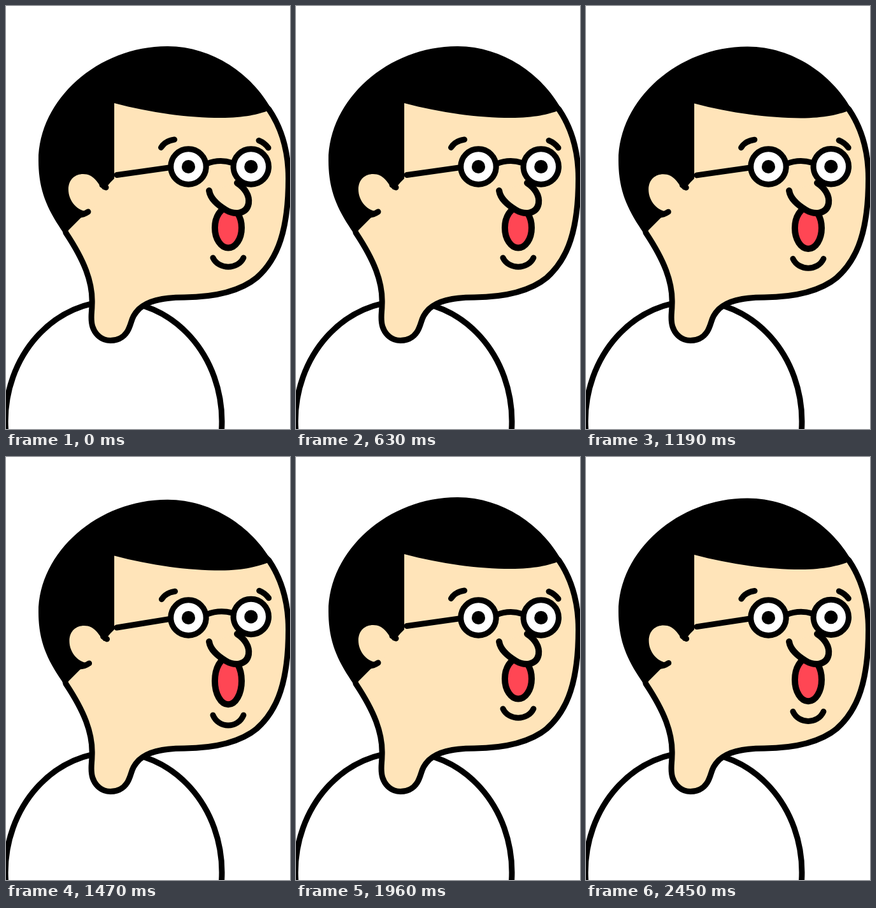
Recreate the animation shown at these times as an HTML page. Size 446 by 662 pixels, loop 2.52 s.

```html
<!DOCTYPE html>
<html lang="en">
<head>
<meta charset="utf-8">
<title>Talking head</title>
<style>
html, body { margin: 0; width: 100%; height: 100%; overflow: hidden; background: #fff; }
svg { display: block; width: 446px; height: 662px; }
.line { fill: none; stroke: #000; stroke-width: 9; stroke-linecap: round; stroke-linejoin: round; }
.bold { stroke-width: 10; }
.skin { fill: #ffe4b9; }
.white { fill: #fff; }
.red { fill: #ff4654; }
</style>
</head>
<body>
<svg viewBox="0 0 446 662">
  <ellipse class="line" cx="169" cy="650" rx="170" ry="188"/>
  <path class="line skin" d="M413 162C434 193 443.5 230 443.5 270C443.5 350 427 396 394 425C366 448 325 455.5 280 456C243 456 222 462 209 474C198 485 198 492 194 502C189 516 178 523.5 164 523.5C150 523.5 140 514 136 502C132 490 135 480 135 468C137 432 122 397 94 355L80 300L110 130L250 90L380 130Z"/>
  <path id="hair"/>
  <g id="ear">
    <path class="skin" d="M131 322C112 322 98 305 98 287C98 271 109 263 121 263C138 263 144 277 152 287L160 289L150 302Z"/>
    <path class="line" d="M113 327Q122 327 129 322M151 280L157 284"/>
  </g>
  <ellipse id="mouth" class="line bold red" cx="349" rx="21"/>
  <path class="line bold skin" d="M319 289C321 302 332 311 345 319C360 328 378 325 381 309C383 296 374 284 363 277"/>
  <path id="smile" class="line"/>
  <path id="browL" class="line" d="M243.5 221.5Q250 211 264.5 209"/>
  <path id="browR" class="line" d="M397 210.5Q406 214 412 222"/>
  <path id="frame" class="line"/>
  <g id="eyeL"><circle class="line white" r="27.7"/><circle r="10.5"/></g>
  <g id="eyeR"><circle class="line white" r="27.7"/><circle r="10.5"/></g>
</svg>
<script>
const STEP = 70, STEPS = 36;
// Jaw drop per step: two beats of talking
const DROP = [0, .22, .62, .95, 1, .78, .45, .18, .04, 0, .12, .42, .75, 1, .92, .6, .27, .1, .03];

const el = id => document.getElementById(id);
const draw = (id, d) => el(id).setAttribute("d", d);
const move = (id, x, y) => el(id).setAttribute("transform", `translate(${x} ${y})`);

function pose(p) {
  const top = 63 + 6 * p, front = 152 + 4 * p, side = 160 + 2 * p;
  draw("hair", `M416 ${side}C386 ${107 + 5 * p} 325 ${top} 253 ${top}
    C145 ${top} 51 ${146 + 4 * p} 51 ${242 + 2 * p}
    C51 290 66 320 ${91 + p} 356L96 353L121 328L164 276L170 270V${front}
    C230 ${front + 16} 290 ${front + 23} 337 ${front + 23}
    C375 ${front + 23} 398 ${side + 9} ${411 + p} ${side + 4}Z`);
  move("ear", 2.5 * p, 1.5 * p);

  const mouth = el("mouth");
  mouth.setAttribute("cy", 347 + 5.5 * p);
  mouth.setAttribute("ry", 31.5 + 8.5 * p);
  const lip = 394 + 16 * p, chin = lip + 19 + 4 * p;
  draw("smile", `M325 ${lip}C334 ${chin} 364 ${chin} 373 ${lip}`);

  const right = 251.5 - 2.5 * p;
  move("browL", 1.5 * p, 2 * p);
  move("browR", p, -2 * p);
  move("eyeL", 286.5, 251.5);
  move("eyeR", 384.8, right);
  draw("frame", `M174 ${264.5 + 4 * p}L256 ${253 + p}M315 ${247 - p}Q335 ${239 - p} 355 ${right - 6}`);
}

let last = -1;
function tick() {
  const step = Math.floor(performance.now() / STEP) % STEPS;
  if (step !== last) pose(DROP[step % DROP.length]);
  last = step;
  requestAnimationFrame(tick);
}
tick();
</script>
</body>
</html>
```
